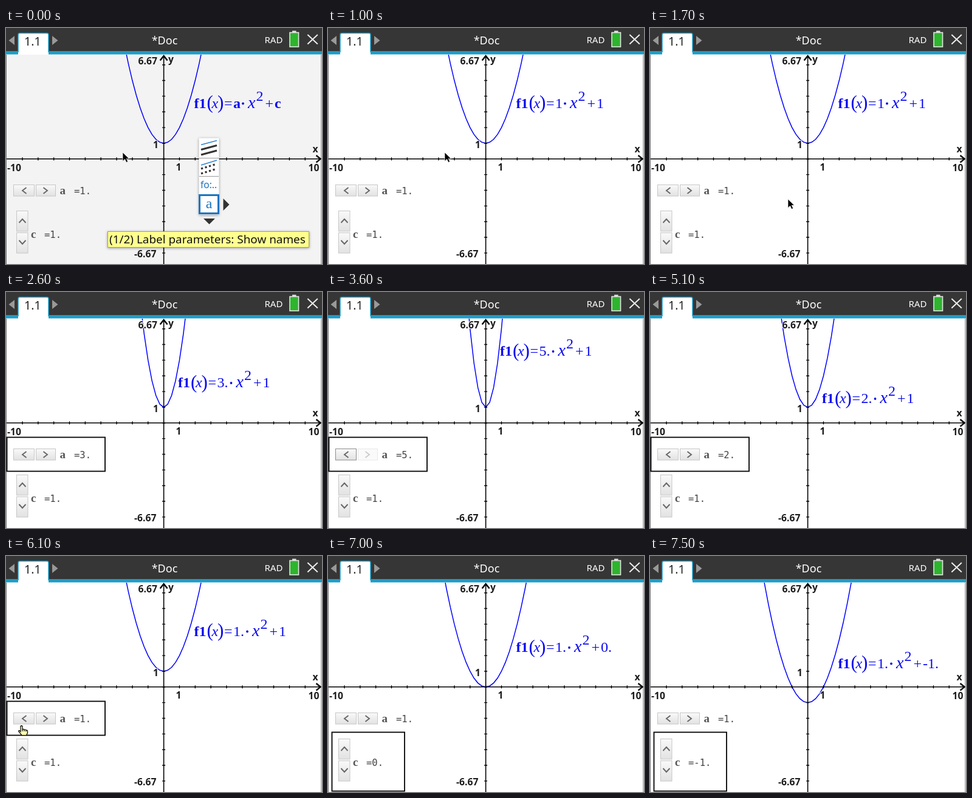
Animation of 520 by 389 pixels, one loop 8000 ms. Source, as an HTML page:

```html
<!DOCTYPE html>
<html lang="en">
<head>
<meta charset="utf-8">
<title>Parabola sliders</title>
<style>
  html, body { margin: 0; width: 100%; height: 100%; overflow: hidden; }
  svg { display: block; width: 100vw; height: 100vh; }
  .ui { font-family: "Noto Sans", "Open Sans", sans-serif; font-weight: 500; }
  .axis { font: 600 15.7px "Noto Sans", "Open Sans", sans-serif; fill: #1c1c1c; stroke: var(--bg); stroke-width: 2; paint-order: stroke; }
  .math { font: 24px "Liberation Serif", serif; fill: #0a0af0; }
  .b { font-weight: bold; }
  .i { font-style: italic; }
  .name { font: bold 19px "Liberation Serif", serif; fill: #555; }
  .value { font: 15.5px "DejaVu Sans Mono", monospace; fill: #444; }
  .frame { fill: none; stroke: #000; stroke-width: 1.8; }
  .raised { filter: drop-shadow(0 1px 2px #0006); }
</style>
</head>
<body>
<svg id="stage" viewBox="0 0 520 389" preserveAspectRatio="none" style="--bg:#fff">
  <defs>
    <linearGradient id="face" x2="0" y2="1">
      <stop offset="0" stop-color="#f9f9f9"/><stop offset="1" stop-color="#e2e2e2"/>
    </linearGradient>
    <clipPath id="plot"><rect x="0" y="44" width="520" height="345"/></clipPath>
  </defs>
  <rect width="520" height="389" fill="var(--bg)"/>
  <path d="M.5 44V389M518.8 44V389" stroke="#777"/>

  <g clip-path="url(#plot)">
    <path id="curve" fill="none" stroke="#00f" stroke-width="1.5"/>
  </g>
  <g stroke="#000" fill="none">
    <path d="M1 215.8H517M259.6 46V389" stroke-width="1.6"/>
    <path id="ticks" stroke-width="1.4"/>
    <path d="M510.5 210L517.5 215.8L510.5 221.6M253.6 53.5L259.6 46L265.6 53.5" stroke-width="2.4"/>
  </g>
  <g class="axis">
    <text x="217.5" y="60">6.67</text>
    <text x="211" y="378">-6.67</text>
    <text x="2" y="236">-10</text>
    <text x="497.5" y="236">10</text>
    <text x="279.5" y="235">1</text>
    <text x="242" y="197.8">1</text>
    <text x="267" y="57">y</text>
    <text x="504.5" y="204.5">x</text>
  </g>
  <g id="formula" class="math"></g>

  <g id="sliders"></g>
  <rect id="frameA" class="frame" x="1.5" y="239.5" width="161.5" height="56"/>
  <rect id="frameC" class="frame" x="6.5" y="290.5" width="119.5" height="97"/>

  <g id="menu">
    <rect class="raised" x="317.5" y="181.5" width="33" height="126" fill="#fff"/>
    <path d="M318 214.5H350M318 244.5H350" stroke="#999"/>
    <path d="M321 192.5L347 185.5M321 226L347 218" stroke="#2c83cf" stroke-width="1.6"/>
    <path d="M321 200.5L347 193.5M321 209L347 202" stroke="#333" stroke-width="3.2"/>
    <path d="M321 232L347 224M321 240L347 232" stroke="#333" stroke-width="3.2" stroke-dasharray="3.2 3.6"/>
    <text class="ui" x="320" y="264" font-size="15.5" fill="#1d73bd">fo:..</text>
    <rect x="318.5" y="275.5" width="31" height="30" fill="#fff" stroke="#1b75c2" stroke-width="3"/>
    <text id="choice" x="334" y="296.5" font-family="Liberation Serif, serif" font-size="24" text-anchor="middle" fill="#1b75c2"></text>
    <path d="M357.5 281V301L367.5 291ZM325 314H344L334.5 323.5Z" fill="#333"/>
    <rect class="raised" x="167.5" y="335.5" width="331" height="26" fill="#ffff8f" stroke="#a3a36a"/>
    <text id="tip" class="ui" x="170" y="355" font-size="18.9" fill="#111"></text>
  </g>

  <g class="ui" fill="#fff">
    <rect width="520" height="39" fill="#363636"/>
    <rect y="38" width="520" height="5.5" fill="#1c9dc8"/>
    <path d="M20 44V11Q20 8.5 22.5 8.5H67.5Q70 8.5 70 11V44"/>
    <path d="M20 40V11Q20 8.5 22.5 8.5H67.5Q70 8.5 70 11V40" fill="none" stroke="#1c9dc8" stroke-width="1.5"/>
    <path d="M14 13V28L4.5 20.5ZM76 13V28L85.5 20.5Z" fill="#999"/>
    <text x="30" y="29" font-size="19.5" fill="#222">1.1</text>
    <text x="261" y="27.3" font-size="18" text-anchor="middle">*Doc</text>
    <text x="425.5" y="24.5" font-size="15">RAD</text>
    <rect x="471" y="4.5" width="6.5" height="3" fill="#ddd"/>
    <rect x="467" y="7.5" width="14.5" height="23.5" fill="#2db52d" stroke="#e4e4e4" stroke-width="1.6"/>
    <path d="M496.3 11L512.8 26.5M512.8 11L496.3 26.5" stroke="#eee" stroke-width="2"/>
  </g>

  <path id="arrow" d="M0 0V14.5L3.6 11.2L6 16.5L8.6 15.3L6.2 10.3H10.5Z" fill="#000" stroke="#fff" stroke-width=".7"/>
  <path id="hand" d="M4 1Q5.5-.5 7 1V6.5Q9 5 10 7Q12 5.7 13 7.7Q15.5 7 15.5 9.5V12L13.5 16H6L1 10Q0 8 2 8L4 10ZM7 6.5V9.5M10 7V9.5M13 7.7V10" fill="#ffffb0" stroke="#000" stroke-width="1.2"/>
</svg>
<script>
const LOOP = 8000, UNIT = 25.85, OX = 259.6, OY = 215.8;
const $ = id => document.getElementById(id);
const set = (el, attrs) => { for (const k in attrs) el.setAttribute(k, attrs[k]); };
const show = (id, on) => set($(id), { display: on ? "inline" : "none" });
const text = (cls, x, y, s, extra = "") => `<text class="${cls}" x="${x}" y="${y}" ${extra}>${s}</text>`;

// last entry whose start time has been reached
const at = (track, t) => track.reduce((cur, step) => t >= step[0] ? step : cur);

const A = [[0, 1], [2200, 2], [2600, 3], [3100, 4], [3600, 5], [4100, 4], [4600, 3], [5100, 2], [5600, 1]];
const C = [[0, 1], [7000, 0], [7500, -1]];
const POINTER = [
  [0, "arrow", 192, 205], [1200, "arrow", 315, 290], [1400, "arrow", 300, 296], [1500, "arrow", 276, 292],
  [1600, "arrow", 251, 287], [1700, "arrow", 227, 282], [1800, "arrow", 150, 273], [1900, "arrow", 88, 268],
  [2000, "hand", 58, 267], [2200, ""], [6100, "hand", 20, 279.5], [6200, "arrow", 55, 312],
  [6300, "arrow", 104, 350], [6400, "arrow", 70, 371], [6500, "hand", 22, 354], [7000, ""]
];

function ticks() {
  let d = "";
  for (let n = -9; n < 10; n++) {
    d += `M${OX + n * UNIT} ${OY - 2.5}v5`;
    if (Math.abs(n) < 7) d += `M${OX - 2.5} ${OY + n * UNIT}h5`;
  }
  return d;
}

function parabola(a, c) {
  const pts = [];
  for (let x = -3; x <= 3; x += 0.25) pts.push([OX + x * UNIT, OY - (a * x * x + c) * UNIT]);
  return "M" + pts.join("L");
}

function formula(a, c, t) {
  const named = t < 500, decimal = t >= 2200, shift = decimal ? 7 : 0;
  const x0 = a === 1 ? 309.5 : 283;
  const y = a === 1 ? 131.5 + (1 - c) * 26.5 : 183 - (a - 2) * 26;
  const part = (cls, dx, s, dy = 0, size = 24) => text(cls, x0 + dx, y + dy, s, `style="font-size:${size}px"`);
  const weight = named ? "b" : "";
  return part("b", 0, "f1") + part("", 21, "(", 1.5, 31) + part("i", 29, "x") + part("", 38.5, ")", 1.5, 31) +
    part("", 49.5, "=") + part(weight, 64.5, named ? "a" : a + (decimal ? "." : "")) +
    `<circle cx="${x0 + 80.5 + shift}" cy="${y - 7}" r="1.9"/>` +
    part("i", 88.5 + shift, "x", 0, 28) + part("", 102 + shift, "2", -12, 24) +
    part("", 117 + shift, "+") + part(weight, 132.5 + shift, named ? "c" : c + (c === 1 ? "" : "."));
}

function button(x, y, w, h, chevron, tone = "") {
  const off = tone === "off", dark = tone === "dark";
  return `<rect x="${x}" y="${y}" width="${w}" height="${h}" fill="${off ? "#fafafa" : "url(#face)"}" ` +
    `stroke="${off ? "#e8e8e8" : dark ? "#8c8c8c" : "#c6c6c6"}"/>` +
    `<path d="${chevron}" fill="none" stroke="${off ? "#ccc" : "#666"}" stroke-width="1.9"/>`;
}

function sliders(a, c, t) {
  const left = a === 5 ? "dark" : "";
  const right = a === 5 ? "off" : t >= 2200 && t < 2400 ? "dark" : "";
  return button(12.5, 258.5, 34, 18.5, "M33.5 263L27 268L33.5 273", left) +
    button(49.5, 258.5, 32, 18.5, "M61.5 263L68 268L61.5 273", right) +
    button(17.5, 301.5, 18.5, 33.5, "M21.5 321L27 315L32.5 321") +
    button(17.5, 337.5, 18.5, 33.5, "M21.5 350L27 356L32.5 350") +
    text("name", 88.5, 274, "a") + text("value", 110.5, 274, `=${a}.`, 'dx="1.5"') +
    text("name", 41, 346, "c") + text("value", 63, 346, `=${c}.`);
}

let last = "";
function render(t) {
  const a = at(A, t)[1], c = at(C, t)[1], [start, kind, px, py] = at(POINTER, t);
  const menu = t < 1000, named = t < 500;
  const key = [a, c, start, menu, named, t < 2400].join();
  if (key === last) return;
  last = key;

  $("stage").style.setProperty("--bg", menu ? "#f3f3f3" : "#fff");
  set($("curve"), { d: parabola(a, c) });
  $("formula").innerHTML = formula(a, c, t);
  $("sliders").innerHTML = sliders(a, c, t);
  show("frameA", t >= 2000 && t < 7000);
  show("frameC", t >= 7000);
  show("menu", menu);
  $("choice").textContent = named ? "a" : "1";
  $("tip").textContent = named ? "(1/2) Label parameters: Show names" : "(2/2) Label parameters: Show values";
  for (const id of ["arrow", "hand"]) {
    show(id, id === kind);
    if (id === kind) set($(id), { transform: `translate(${px} ${py})` });
  }
}

set($("ticks"), { d: ticks() });
const begin = performance.now();
function tick() {
  render((performance.now() - begin) % LOOP);
  requestAnimationFrame(tick);
}
tick();
</script>
</body>
</html>
```
